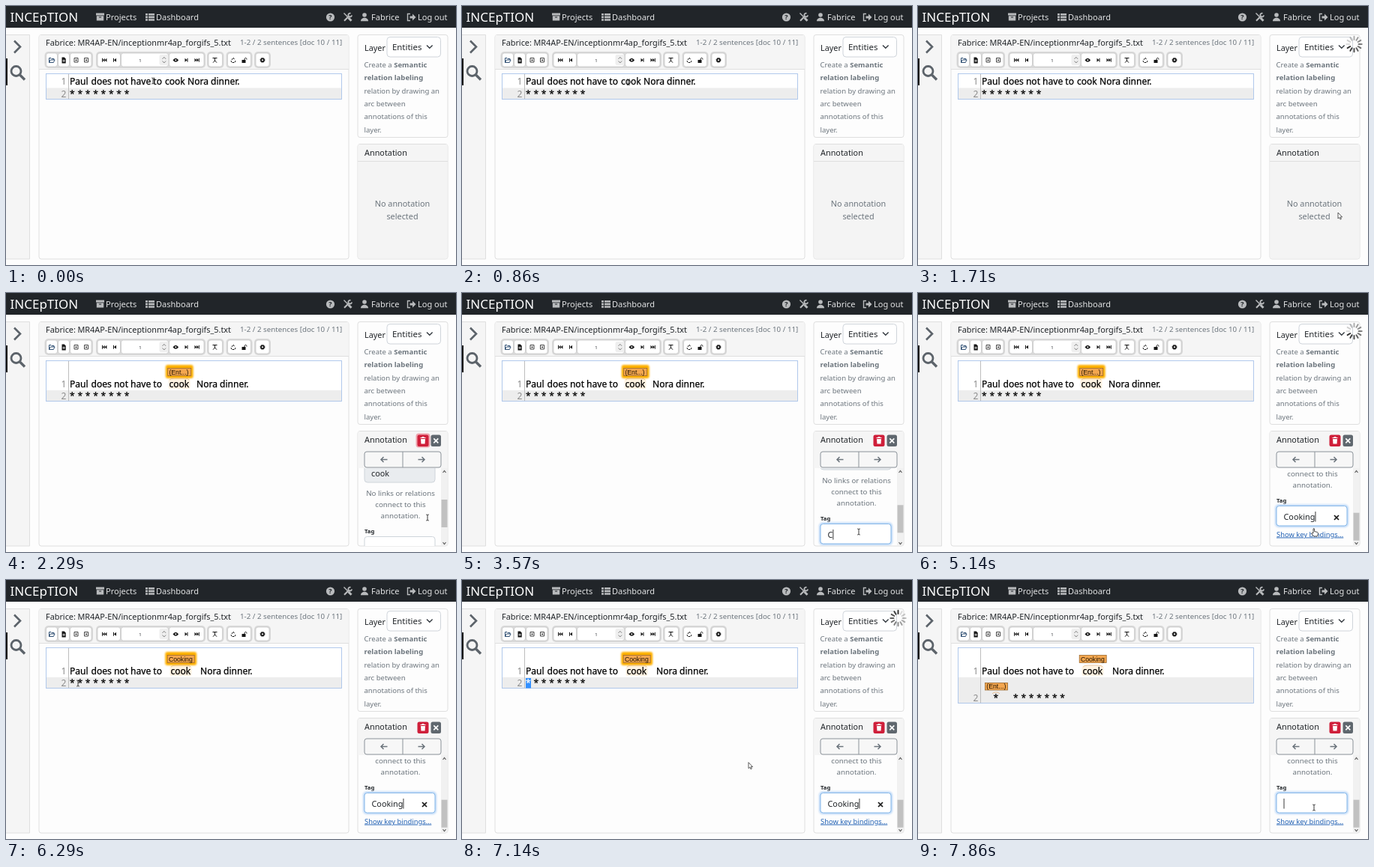
An HTML page that plays this animation: 600x346 px, repeating every 8000 ms.

```html
<!DOCTYPE html>
<html lang="en">
<head>
<meta charset="utf-8">
<title>Annotation editor</title>
<style>
html, body { margin: 0; width: 100%; height: 100%; overflow: hidden; background: #fdfdfd; }
svg { display: block; width: 600px; height: 346px; }
text { font: 10.85px "Noto Sans", sans-serif; fill: #212529; white-space: pre; }
.nav { font-size: 11px; fill: #e2e3e4; }
.small { font-size: 9.75px; fill: #6c757d; }
.about { font-size: 9.55px; }
.mid { text-anchor: middle; }
.doc { font-size: 12.05px; fill: #000; stroke: #000; stroke-width: .25; }
.num { font-size: 12.05px; fill: #8c8c8c; text-anchor: end; }
.stars { word-spacing: .62px; }
.tag { font: 8.7px "Liberation Sans", Arial, sans-serif; fill: #221400; }
.card { fill: #fdfdfd; stroke: #dfdfdf; }
.head { fill: #f5f5f5; }
.line { fill: none; stroke: #dfdfdf; }
.label { fill: #f3a64f; stroke: #9c6a2e; stroke-width: .8; }
.hi { fill: #fff3e2; }
.brace { fill: none; stroke: #e3b27c; stroke-width: .8; }
.glow { fill: #ffb000; filter: blur(1.2px); }
.tool { fill: #fff; stroke: #cbcbcb; stroke-width: .8; }
.ink { fill: #161616; }
.pen { fill: none; stroke: #161616; stroke-width: 1; }
</style>
</head>
<body>
<svg viewBox="0 0 600 346">
  <defs>
    <clipPath id="pane"><rect x="469.5" y="234" width="111" height="104"/></clipPath>
  </defs>
  <rect width="600" height="346" fill="#fdfdfd"/>

  <!-- top bar -->
  <rect width="600" height="29" fill="#212529"/>
  <text x="5.5" y="21" style="font-size:17px;fill:#fff">INCEpTION</text>
  <g fill="#b9bbbd">
    <path d="M120 9.5h11v3h-11zM120.8 13.3h9.4v6.2h-9.4z"/>
    <path d="M124 15h3" stroke="#212529"/>
    <path d="M186 10h3v2.6h-3zM190 10h8v2.6h-8zM186 13.6h3v2.6h-3zM190 13.6h8v2.6h-8zM186 17.2h3v2.6h-3zM190 17.2h8v2.6h-8z"/>
    <circle cx="432.5" cy="15" r="5.6"/>
    <circle cx="478" cy="12" r="2.8"/>
    <path d="M473 20.3c0-6 10-6 10 0z"/>
    <path d="M538.5 13.5h3.5v-3l4.5 4.5-4.5 4.5v-3h-3.5z"/>
  </g>
  <text class="mid" x="432.5" y="18.3" style="font-size:9px;font-weight:700">?</text>
  <g fill="none" stroke="#b9bbbd">
    <path d="M450.5 9.5l5 5" stroke-width="1.4"/>
    <path d="M456.5 15.8l4 4" stroke-width="3"/>
    <path d="M451 19.8l6.5-6.5" stroke-width="2.2"/>
    <path d="M459.5 9.8a2.4 2.4 0 1 0 1.6 2.6" stroke-width="1.8"/>
    <path d="M539 10.5h-3.5v9h3.5" stroke-width="1.4"/>
  </g>
  <text class="nav" x="133" y="19">Projects</text>
  <text class="nav" x="200" y="19">Dashboard</text>
  <text class="nav" x="487" y="19">Fabrice</text>
  <text class="nav" x="549" y="19">Log out</text>

  <!-- sidebar -->
  <path class="head" d="M0 38h31.5v300h-31.5z"/>
  <path class="line" d="M0 38.5h31.5v299.5h-31.5"/>
  <rect y="70" width="2" height="36" fill="#111"/>
  <path d="M11 46.5l8 8-8 8" fill="none" stroke="#5c636a" stroke-width="2.6"/>
  <circle cx="13.5" cy="87" r="6.5" fill="none" stroke="#5c636a" stroke-width="2.8"/>
  <path d="M18.5 92l6.5 6.5" stroke="#5c636a" stroke-width="3.4"/>

  <!-- document -->
  <rect class="card" x="44" y="38.5" width="413" height="299.5" rx="3"/>
  <path class="head" d="M44.5 39h412v45.5h-412z"/>
  <path class="line" d="M44 84.5h413"/>
  <text x="53" y="52.5">Fabrice:</text>
  <text x="95.5" y="52.5">MR4AP-EN/inceptionmr4ap_forgifs_5.txt</text>
  <text class="small" x="312" y="52">1-2 / 2 sentences [doc 10 / 11]</text>
  <g id="tools"></g>
  <path d="M57.5 75.5v-6h2.5l1 1h3v1.5M57.5 75.5l1.7-3.5h5.8l-1.7 3.5z" fill="none" stroke="#1c3f66" stroke-width=".9"/>
  <path class="ink" d="M74.5 68.5h3.2l2 2v6h-5.2z"/>
  <path d="M77.1 71.5v3.4M75.4 73.2h3.4" stroke="#fff" stroke-width=".8"/>
  <path class="pen" d="M91 69.5h5v5.5h-5zM104.500 69.5h5v5.5h-5z" style="stroke-width:.8"/>
  <path class="ink" d="M92.700 71.5h1.700v1.700h-1.700zM106.200 71.5h1.700v1.700h-1.700z"/>
  <path class="ink" d="M128 69.7h1v5h-1zM131.600 69.7v5l-2.600-2.500zM134.400 69.7v5l-2.700-2.500zM143 69.7h1v5h-1zM147 69.7v5l-3-2.500z"/>
  <text class="mid" x="179" y="74.5" style="font-size:5.8px">1</text>
  <rect x="204.500" y="65" width="12" height="14" rx="2" fill="#efefef"/>
  <path d="M208.500 70.800l2.300-2.500 2.300 2.500M208.500 73.500l2.300 2.500 2.300-2.500" fill="none" stroke="#666" stroke-width=".8"/>
  <path class="ink" d="M222.500 72.300q3.800-5 7.600 0-3.800 5-7.600 0z"/>
  <circle cx="226.300" cy="72.200" r="1" fill="#fff"/>
  <path class="ink" d="M238.500 69.7v5l3-2.500zM241.500 69.7h1v5h-1zM251.500 69.7v5l2.700-2.500zM254.200 69.7v5l2.600-2.500zM256.800 69.7h1v5h-1z"/>
  <path class="pen" d="M275.500 69.5h6M278.500 69.5v4M276 75.7l2.500-2.700 2.500 2.700"/>
  <path class="pen" d="M301 72l2-3 2 3M306 73l-1 2.500h-4l-1-2.500" style="stroke-dasharray:2.5 1"/>
  <path class="ink" d="M314.500 72h5v4h-5z"/>
  <path class="pen" d="M318 72v-1.500q1.500-2.500 3 0v1"/>
  <circle cx="342" cy="72.300" r="2" class="pen" style="stroke-width:1.7"/>
  <circle cx="342" cy="72.300" r="3" class="pen" style="stroke-dasharray:1.2 1.156"/>

  <rect x="53" y="90" width="395" id="page" fill="#fff"/>
  <rect x="53" width="395" id="row2" fill="#ededed"/>
  <path id="gutter" stroke="#bdbdbd"/>
  <rect x="53.5" y="90.5" width="394" id="frame" fill="none" stroke="#a9c4ea" stroke-width=".9"/>
  <g id="row1">
    <text class="num" x="80.5">1</text>
    <text class="doc" x="85">Paul</text>
    <text class="doc" x="113.500">does not have to</text>
  </g>
  <rect class="hi" id="cookHi" y="115" width="29" height="13" rx="2"/>
  <rect id="cookSel" x="211.500" y="94" width="28" height="14" fill="#3390ff"/>
  <text class="doc" id="cook">cook</text>
  <text class="doc" id="rest">Nora dinner.</text>
  <text class="num" id="num2" x="80.5">2</text>
  <rect id="starSel" x="85" y="131" width="7" height="13.5" fill="#3390ff"/>
  <text class="doc" id="star1">*</text>
  <text class="doc stars" id="stars">* * * * * * *</text>

  <g id="tag1">
    <rect class="glow" id="glow" y="96" height="18" rx="3"/>
    <rect class="label" id="box1" y="100.500" height="10"/>
    <text class="tag" id="word1" y="108.800"></text>
    <path class="brace" id="brace1"/>
  </g>
  <g id="tag2">
    <rect class="label" x="89.5" y="137.5" width="30" height="9.5"/>
    <text class="tag" x="91.300" y="145.400">(Ent...)</text>
    <path class="brace" d="M99 152q1-2 5-2 4 0 5 2"/>
  </g>

  <!-- layer -->
  <rect class="card" x="469" y="38.5" width="120" height="137" rx="3"/>
  <text x="478" y="60">Layer</text>
  <rect x="508" y="41.5" width="71.5" height="26.5" rx="4" fill="#fff" stroke="#cfd4da"/>
  <text x="515" y="59" style="font-size:11.4px">Entities</text>
  <path d="M561 52.5l3.800 3.800 3.800-3.800" fill="none" stroke="#343a40" stroke-width="1.4"/>
  <g id="about"></g>

  <!-- annotation -->
  <rect class="card" x="469" y="184.5" width="120" height="153.5" rx="3"/>
  <path class="head" d="M469.5 185h119v22.5h-119z"/>
  <text x="478" y="200">Annotation</text>
  <g id="none">
    <path d="M469.5 208h119v129.500h-119z" fill="#f4f4f4"/>
    <path class="line" d="M469 207.5h120"/>
    <text class="mid" x="528.5" y="268" style="fill:#6c757d">No annotation</text>
    <text class="mid" x="528.5" y="285" style="fill:#6c757d">selected</text>
  </g>
  <g id="some">
    <path class="head" d="M469.5 207h119v27h-119z"/>
    <rect id="ring" x="546.5" y="187.5" width="19" height="19" rx="4" fill="#efa3ad"/>
    <rect x="548.5" y="189.5" width="15" height="15.5" rx="2.5" fill="#cf1f3a"/>
    <path d="M552.500 193.500h7M554.500 192.700h3" stroke="#fff" stroke-width="1.2"/>
    <path d="M553 195h6l-.5 6.500h-5z" fill="#fff"/>
    <rect x="566.500" y="189.500" width="13.500" height="15.500" rx="2.5" fill="#5f676e"/>
    <path d="M570.300 194.300l6 6M576.300 194.300l-6 6" stroke="#fff" stroke-width="1.7"/>
    <rect x="478" y="212" width="102" height="21" rx="3" fill="#f7f7f7" stroke="#8b9299"/>
    <path d="M529 212v21" stroke="#8b9299"/>
    <path d="M508.500 222.500h-8.500m3.500-3.500l-3.500 3.500 3.500 3.500M549.500 222.500h8.500m-3.500-3.500l3.500 3.500-3.500 3.500" fill="none" stroke="#6c757d" stroke-width="1.5"/>
    <g clip-path="url(#pane)"><g id="scroll">
      <rect x="478" y="226" width="94" height="27" rx="4" fill="#e9ecef" stroke="#ced4da"/>
      <text x="487" y="245">cook</text>
      <text class="small mid" x="526" y="271">No links or relations</text>
      <text class="small mid" x="526" y="286">connect to this</text>
      <text class="small mid" x="526" y="301">annotation.</text>
      <text x="478" y="321" style="font-size:7.7px;font-weight:700">Tag</text>
      <rect id="focus" x="476" y="323.500" width="98" height="30.500" rx="5" fill="#bcd8f8" style="filter:blur(1.2px)"/>
      <rect id="field" x="478" y="325.500" width="94" height="26.500" rx="3.5" fill="#fff"/>
      <text id="value" x="487.500" y="344"></text>
      <path id="caret" stroke="#222" stroke-width=".9"/>
      <path id="clear" d="M555 338l6 6M561 338l-6 6" stroke="#111" stroke-width="1.7"/>
      <text x="478" y="366.500" style="font-size:9.4px;fill:#2463b5;text-decoration:underline">Show key bindings...</text>
    </g></g>
    <path d="M580 234h8.500v103.500h-8.500z" fill="#f1f1f1"/>
    <rect id="thumb" x="580.500" width="8" height="37" fill="#c1c1c1"/>
    <path d="M582.500 240l2-2.500 2 2.500M582.500 333l2 2.500 2-2.500" fill="none" stroke="#555" stroke-width="1.1"/>
  </g>

  <g id="spin"></g>

  <!-- pointers -->
  <g id="ibeam" fill="none" stroke="#222" stroke-width=".9"><path d="M-1.800-4q1.800 0 1.800 1 0-1 1.800-1M0-3v6M-1.800 4q1.800 0 1.800-1 0 1 1.800 1"/></g>
  <g id="arrow"><path d="M-2-5v8l1.800-1.600 1.300 2.700 1.300-.7-1.200-2.500h2.400z" fill="#fff" stroke="#333" stroke-width=".8"/></g>
  <g id="hand"><path d="M-2-4q1-1 1.600 0v3.500l4 1q1 .5.700 2l-.8 3.500h-5l-2.800-4q.8-1.500 2.300 0z" fill="#fff" stroke="#222" stroke-width=".8"/></g>
</svg>
<script>
const LOOP = 8000, STEP = 1000 / 7;
const $ = id => document.getElementById(id);
const set = (id, attrs) => { for (const a in attrs) $(id).setAttribute(a, attrs[a]); };
const show = (id, on) => { $(id).style.display = on ? "" : "none"; };
const within = (k, a, b) => k >= a && k < b;

// Toolbar groups: start, then the right edge of each button
$("tools").innerHTML = [
  [53, 69, 85, 114.5], [121.5, 153, 217, 264.5], [269.5, 289], [295, 327], [332.5, 351.5]
].map(([left, ...ends]) => {
  const right = ends[ends.length - 1];
  let x = left, out = `<rect x="${left - 1.5}" y="61" width="${right - left + 3}" height="22" rx="5" fill="#d8d8d8"/>`;
  for (const end of ends) {
    out += `<rect class="tool" x="${x + .5}" y="63" width="${end - x - 1}" height="18" rx="3"/>`;
    x = end;
  }
  return out;
}).join("");

$("about").innerHTML = [
  'Create a <tspan font-weight="700">Semantic</tspan>', '<tspan font-weight="700">relation labeling</tspan>',
  "relation by drawing an", "arc between", "annotations of this", "layer."
].map((s, i) => `<text class="small about" x="477.5" y="${82 + i * 17.35}">${s}</text>`).join("");

$("spin").innerHTML = Array.from({ length: 12 }, (_, i) =>
  `<path d="M0-6V-10.2" stroke="#222" stroke-width="2" stroke-linecap="round" opacity="${.15 + i * .07}" transform="rotate(${i * 30 - 90})"/>`
).join("");

// Pointer path: step, x, y
const path = [
  [0, 196, 100], [7, 226, 102], [10, 226, 102], [12, 562, 281], [13, 562, 281], [16, 562, 300],
  [17, 562, 300], [20, 529, 319], [38, 529, 319], [44, 96, 138], [48, 96, 138], [51, 528, 304], [56, 528, 304]
];
const shapes = [[11, "ibeam"], [14, "arrow"], [32, "ibeam"], [38, "hand"], [43, "arrow"], [49, "ibeam"], [51, "arrow"], [99, "ibeam"]];

function pointer(k) {
  const i = path.findIndex(p => p[0] > k);
  const [k0, x0, y0] = path[i - 1], [k1, x1, y1] = path[i];
  const f = (k - k0) / (k1 - k0);
  const shape = shapes.find(s => k < s[0])[1];
  for (const id of ["ibeam", "arrow", "hand"]) show(id, id === shape);
  set(shape, { transform: `translate(${x0 + (x1 - x0) * f} ${y0 + (y1 - y0) * f})` });
}

function editor(k) {
  const tagged = k >= 13, named = k >= 37, second = k >= 51;
  const base1 = tagged ? 126 : 105, top2 = tagged ? 130 : 109.5;
  const bottom = second ? 165 : tagged ? 145 : 125, base2 = bottom - 3.5;
  set("page", { height: bottom - 90 });
  set("frame", { height: bottom - 91 });
  set("row2", { y: top2, height: bottom - top2 });
  set("gutter", { d: `M83.5 90V${bottom}` });
  for (const t of $("row1").children) t.setAttribute("y", base1);
  const cookX = named ? 219.5 : tagged ? 217.5 : 212;
  set("cook", { x: cookX, y: base1 });
  set("rest", { x: named ? 259 : tagged ? 254 : 242, y: base1 });
  set("num2", { y: base2 + .5 });
  set("star1", { x: second ? 100.5 : 85, y: base2 + .5 });
  set("stars", { x: second ? 127 : 95.4, y: base2 + .5 });

  const cookOn = within(k, 9, 12), starOn = within(k, 47, 51);
  show("cookSel", cookOn);
  show("starSel", starOn);
  for (const [id, on] of [["cook", cookOn], ["star1", starOn]])
    $(id).style.fill = $(id).style.stroke = on ? "#fff" : "";

  show("cookHi", tagged);
  set("cookHi", { x: cookX - 1 });
  show("tag1", tagged);
  show("tag2", second);
  show("glow", !second);
  const w = named ? 36 : 31, mid = cookX + 13.7, left = mid - w / 2;
  set("box1", { x: left, width: w });
  set("glow", { x: left - 3, width: w + 6 });
  set("word1", { x: left + 1.7 });
  $("word1").textContent = named ? "Cooking" : "(Ent...)";
  set("brace1", { d: `M${mid - 13} 116q1-2 6-2h14q5 0 6 2` });
}

function sidebar(k) {
  const tagged = k >= 13, cleared = k >= 51;
  show("none", !tagged);
  show("some", tagged);
  show("ring", within(k, 13, 20) || within(k, 51, 54));
  const offset = k < 20 ? 0 : k < 32 ? 17 : 41;
  set("scroll", { transform: `translate(0 ${-offset})` });
  set("thumb", { y: 276 + offset * .43 });

  const count = k < 24 || cleared ? 0 : Math.min(7, 1 + Math.floor((k - 24) / 1.1));
  $("value").textContent = "Cooking".slice(0, count);
  const focused = within(k, 20, 51) || k >= 54;
  show("focus", focused);
  show("caret", focused);
  show("clear", count > 1);
  set("field", { stroke: focused ? "#86b7e8" : "#ced4da" });
  const x = 488 + (count ? $("value").getComputedTextLength() : 0);
  set("caret", { d: `M${x} 333v13.5` });
}

function draw() {
  const t = (performance.now() - start) % LOOP;
  const k = Math.min(55, Math.floor(t / STEP + .05));
  editor(k);
  sidebar(k);
  pointer(k);
  show("spin", within(k, 11, 13) || within(k, 33, 38) || within(k, 49, 51));
  set("spin", { transform: `translate(581.5 51) rotate(${k * 60})` });
  requestAnimationFrame(draw);
}
const start = performance.now();
draw();
</script>
</body>
</html>
```
